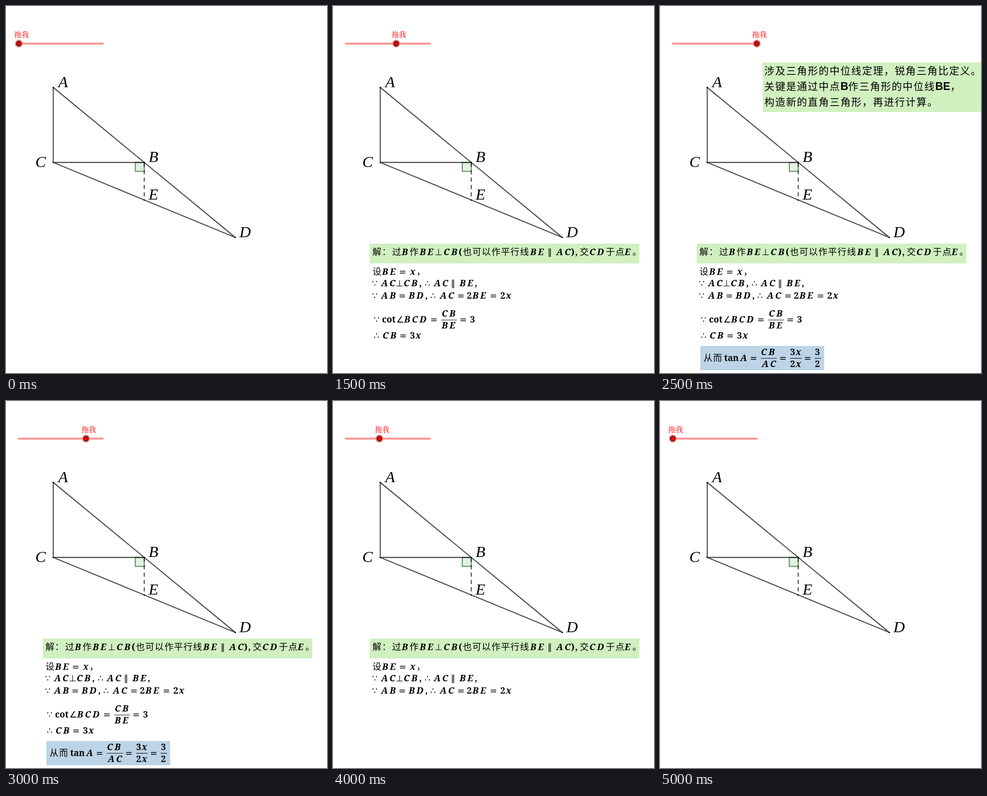
Animation, 700 px wide and 800 px high, one loop 5500 ms. Source, as an HTML page:

```html
<!DOCTYPE html>
<html lang="zh">
<head>
<meta charset="utf-8">
<title>中位线与锐角三角比</title>
<style>
  html, body { margin: 0; width: 100%; height: 100%; overflow: hidden; background: #fff; }
  svg { display: block; width: 700px; height: 800px; }
  .label { font: italic 34.5px "Liberation Serif", serif; }
  .han { font: 19.5px "Noto Sans CJK SC", "Noto Sans CJK", sans-serif; letter-spacing: 1.3px; }
  .var { font: italic bold 19.5px "Noto Serif", serif; letter-spacing: 3.8px; }
  .num { font: bold 19px "Noto Serif", serif; }
  .sym { font: 19px "DejaVu Sans", sans-serif; }
  .note { font: 22px "Noto Sans CJK SC", "Noto Sans CJK", sans-serif; letter-spacing: 1.7px; }
  .note .b { font: bold 23.7px "Liberation Sans", sans-serif; letter-spacing: 0; }
  .drag { font: 300 16px "Noto Serif CJK SC", "Noto Sans CJK SC", "Noto Sans CJK", serif; fill: #f00; }
  .bar { stroke: #000; stroke-width: 1.2; }
</style>
</head>
<body>
<svg viewBox="0 0 700 800" lang="zh-CN">
  <path d="M28 82H211" stroke="#ff9999" stroke-width="4.6" stroke-linecap="round"/>
  <g id="handle">
    <text class="drag" x="-10" y="-14">拖我</text>
    <circle r="8.4" fill="#ea8080"/>
    <circle r="5.2" fill="#f00" stroke="#000" stroke-width="1.2"/>
  </g>

  <rect x="282" y="341" width="19.5" height="19.5" fill="#006400" fill-opacity=".1"
        stroke="#006400" stroke-opacity=".65" stroke-width="2.2"/>
  <g fill="none" stroke="#000" stroke-opacity=".7" stroke-width="2.3" stroke-linejoin="round">
    <path d="M301.5 341H103V177.5L500 504.5L103 341"/>
    <path d="M301.5 341V423" stroke-dasharray="9 7" stroke-dashoffset="-1"/>
  </g>
  <g id="points"></g>
  <g id="steps"></g>
</svg>
<script>
const NS = "http://www.w3.org/2000/svg";
const STEP_MS = 500, LAST = 5, CYCLE = 2 * LAST + 1;
const GREEN = "#d0f0c0", BLUE = "#bcd4e6";

function add(parent, tag, attrs, text = "") {
  const node = document.createElementNS(NS, tag);
  for (const key in attrs) node.setAttribute(key, attrs[key]);
  node.textContent = text;
  parent.appendChild(node);
  return node;
}

function kind(text) {
  if (/[\u4e00-\u9fff：。，]/.test(text)) return "han";
  if (/[⊥∥∵∴∠=]/.test(text)) return "sym";
  return /^[A-Zx]+$/.test(text) ? "var" : "num";
}

// Places alternating x, text items on one baseline.
function row(parent, y, ...items) {
  for (let i = 0; i < items.length; i += 2) {
    const cls = kind(items[i + 1]);
    const x = items[i] + (cls === "var" ? 1 : 0);
    add(parent, "text", { x, y, class: cls }, items[i + 1]);
  }
}

function box(parent, x, y, width, height, fill) {
  add(parent, "rect", { x, y, width, height, fill });
}

function bar(parent, x1, x2, y) {
  add(parent, "path", { class: "bar", d: `M${x1} ${y}H${x2}` });
}

// Each point: x, y, then the label's position.
const points = {
  A: [103, 177.5, 114, 176.5], B: [301.5, 341, 311, 340], C: [103, 341, 64, 350.5],
  D: [500, 504.5, 509, 503.5], E: [301.5, 423, 311, 422]
};
const pointLayer = document.getElementById("points");
for (const [name, [cx, cy, x, y]] of Object.entries(points)) {
  add(pointLayer, "circle", { cx, cy, r: 1.6 });
  add(pointLayer, "text", { x, y, class: "label" }, name);
}

const builders = [
  g => {
    box(g, 80, 518, 588, 43, GREEN);
    row(g, 543, 86, "解：", 129, "过", 149, "B", 167, "作", 188, "BE", 222, "⊥", 240, "CB", 274, "(",
      283, "也可以作平行线", 429, "BE", 468, "∥", 486, "AC", 519, ")", 528, ",",
      538, "交", 558, "CD", 595, "于点", 635, "E", 653, "。");
  },
  g => {
    row(g, 586, 86, "设", 106, "BE", 144, "=", 167, "x", 182, "，");
    row(g, 611, 85, "∵", 104, "AC", 137, "⊥", 153, "CB", 188, ",",
      200, "∴", 219, "AC", 257, "∥", 275, "BE", 309, ",");
    row(g, 638, 85, "∵", 104, "AB", 143, "=", 164, "BD", 201, ",", 212, "∴",
      232, "AC", 271, "=", 292, "2", 303, "BE", 342, "=", 365, "2", 376, "x");
  },
  g => {
    row(g, 690, 89, "∵", 107, "cot", 138, "∠", 154, "BCD", 212, "=", 276, "=", 299, "3");
    row(g, 677, 236, "CB");
    bar(g, 236, 270, 684.5);
    row(g, 703, 236, "BE");
    row(g, 725, 89, "∴", 107, "CB", 145, "=", 168, "3", 179, "x");
  },
  g => {
    box(g, 88, 741, 270, 53, BLUE);
    row(g, 774, 95, "从而", 140, "tan", 174, "A", 196, "=", 260, "=", 314, "=");
    row(g, 761, 219, "CB", 284, "3", 295, "x", 338, "3");
    row(g, 787, 221, "AC", 284, "2", 295, "x", 338, "2");
    bar(g, 220, 255, 768);
    bar(g, 284, 309, 768);
    bar(g, 337, 351, 768);
  },
  g => {
    box(g, 224, 123, 476, 108, GREEN);
    const note = (y, text) => add(g, "text", { x: 227.5, y, class: "note" }, text);
    note(149, "涉及三角形的中位线定理，锐角三角比定义。");
    const middle = note(183, "");
    for (const part of ["关键是通过中点", "B", "作三角形的中位线", "BE", "，"])
      add(middle, "tspan", { class: /[A-Z]/.test(part) ? "b" : "" }, part);
    note(217, "构造新的直角三角形，再进行计算。");
  }
];

const stepLayer = document.getElementById("steps");
const steps = builders.map(build => {
  const group = add(stepLayer, "g", {});
  build(group);
  return group;
});
const handle = document.getElementById("handle");

function draw(ms) {
  const tick = Math.floor(ms / STEP_MS) % CYCLE;
  const step = LAST - Math.abs(LAST - tick);
  handle.setAttribute("transform", `translate(${28 + 36.6 * step} 82)`);
  steps.forEach((group, i) => group.setAttribute("visibility", i < step ? "visible" : "hidden"));
}

let start;
function frame(now) {
  start ??= now;
  draw(now - start);
  requestAnimationFrame(frame);
}
draw(0);
requestAnimationFrame(frame);
</script>
</body>
</html>
```
